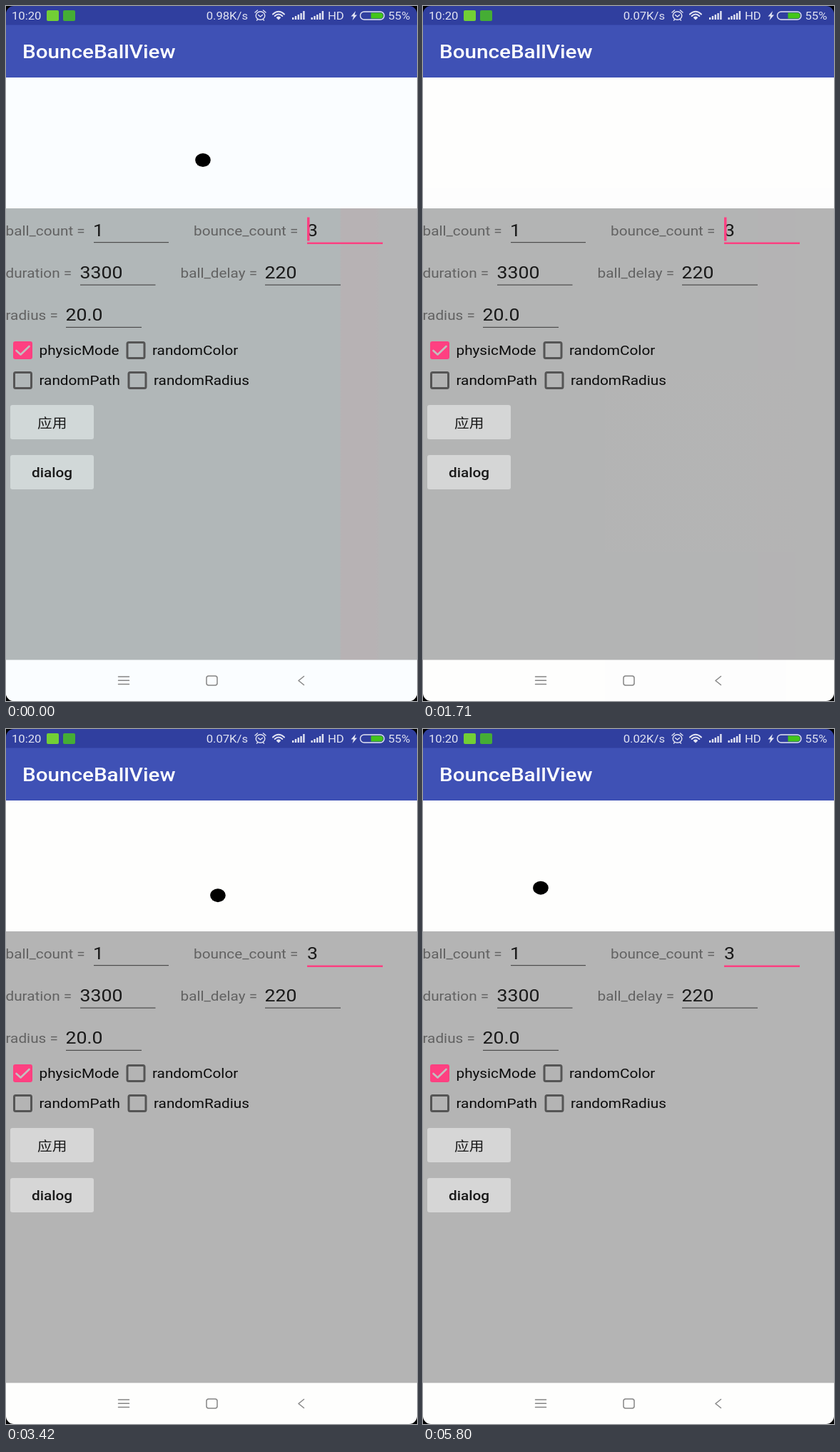
Animation of 576x972 px, one loop 5.84 s. Source, as an HTML page:

```html
<!DOCTYPE html>
<html lang="zh">
<head>
<meta charset="utf-8">
<title>Bounce ball</title>
<style>
  html, body { margin: 0; width: 100%; height: 100%; overflow: hidden; background: #000; }
  svg { display: block; width: 576px; height: 972px; }
  text { font-family: Roboto, "Noto Sans CJK SC", "Noto Sans CJK", sans-serif; white-space: pre; }
  .status { font-size: 14.6px; fill: #e3e5f3; }
  .title { font-size: 26px; font-weight: 500; fill: #fff; }
  .label { font-size: 18.2px; fill: #626262; }
  .field { font-size: 23.4px; fill: #191919; }
  .check { font-size: 18.2px; fill: #0c0c0c; }
  .button { font-size: 18.2px; fill: #191919; }
  .bold { font-weight: 500; }
  .line { fill: none; stroke-linecap: round; stroke-linejoin: round; }
</style>
</head>
<body>
<svg viewBox="0 0 576 972">
  <defs>
    <linearGradient id="tint">
      <stop offset=".812" stop-color="#b1b7b8"/>
      <stop offset=".816" stop-color="#b7b2b4"/>
      <stop offset=".9" stop-color="#b7b2b4"/>
      <stop offset=".91" stop-color="#b4b4b5"/>
    </linearGradient>
    <clipPath id="screen"><rect width="576" height="972" rx="11"/></clipPath>
    <g id="bars" fill="#e3e5f3">
      <rect y="10" width="2.4" height="3"/><rect x="3.8" y="8" width="2.4" height="5"/>
      <rect x="7.6" y="6" width="2.4" height="7"/><rect x="11.4" y="4" width="2.4" height="9"/>
      <rect x="15.2" y="1" width="2.4" height="12"/>
    </g>
    <rect id="box" x="1.5" y="1.5" width="24" height="22" rx="2" fill="none" stroke="#555" stroke-width="3"/>
    <rect id="btn" x="6" width="117" height="48" rx="3"/>
  </defs>

  <g clip-path="url(#screen)">
    <rect width="576" height="27" fill="#303f9f"/>
    <rect y="26.5" width="576" height="74" fill="#3f51b5"/>
    <rect y="100" width="576" height="183" fill="#fefefd"/>
    <rect y="283" width="576" height="632" fill="#b4b4b4"/>
    <rect y="914.5" width="576" height="58" fill="#fefefd"/>
    <g fill="#d6d6d6"><use href="#btn" y="558"/><use href="#btn" y="628"/></g>
    <g id="wash">
      <rect y="100" width="576" height="183" fill="#fafdff"/>
      <rect y="283" width="576" height="632" fill="url(#tint)"/>
      <rect y="914.5" width="576" height="58" fill="#fafdff"/>
      <g fill="#d1d8d8"><use href="#btn" y="558"/><use href="#btn" y="628"/></g>
    </g>

    <rect x="57" y="6" width="17" height="15" rx="2" fill="#72cf35"/>
    <rect x="80" y="6" width="17" height="15" rx="2" fill="#45ad35"/>
    <g class="line" stroke="#e3e5f3" stroke-width="1.4">
      <ellipse cx="356.5" cy="13.5" rx="6.3" ry="5.8"/>
      <path d="M353.5 12.5 356.5 15 359.5 12.5M349 9l3.5-3M364 9l-3.5-3M351.5 20l1.5-1.5M361.5 20l-1.5-1.5"/>
      <path d="M374 11.5q8-7.5 16 0M376.7 14q5.3-5 10.6 0" stroke-width="2"/>
      <path d="M379.6 16.2q2.4-2 4.8 0L382 18.5z" fill="#e3e5f3"/>
      <rect x="496.5" y="8" width="33.5" height="11" rx="5.5"/>
    </g>
    <use href="#bars" x="401" y="6"/>
    <use href="#bars" x="427.5" y="6"/>
    <path d="M490 7 483.5 14.5H487L485.5 20 492 12.5H488.5z" fill="#e3e5f3"/>
    <path d="M511.5 9.5H524.5a4 4 0 0 1 0 8H511.5z" fill="#43c51a"/>

    <use href="#box" x="168.5" y="469"/>
    <use href="#box" x="10" y="511"/>
    <use href="#box" x="170.5" y="511"/>
    <rect x="10" y="469" width="27" height="25" rx="3" fill="#ff4081"/>
    <path class="line" d="M14.5 482 20.5 487.5 32.5 476" stroke="#c3bfbf" stroke-width="2.6"/>

    <g fill="#4d4d4d">
      <rect x="123" y="330" width="105" height="1.2"/>
      <rect x="104" y="389.5" width="105.5" height="1.2"/>
      <rect x="363" y="389.5" width="106" height="1.2"/>
      <rect x="84" y="448.8" width="106" height="1.2"/>
    </g>
    <rect x="422" y="330.5" width="106" height="2.5" fill="#ff4081"/>

    <g class="line" stroke="#858585" stroke-width="1.5">
      <path d="M157.5 938h15M157.5 943.2h15M157.5 948.4h15"/>
      <rect x="281" y="937" width="15" height="13" rx="3"/>
      <path d="M417.5 937.5 410 943.5 417.5 949.5"/>
    </g>

    <g id="texts"></g>
    <rect id="cursor" x="422" y="295.5" width="3.5" height="33" fill="#ff4081"/>
    <ellipse id="ball" rx="10.8" ry="9.5"/>
  </g>
</svg>

<script>
const LOOP = 5840, STEP = 41.75, CYCLE = 3300, START = 1730;
const el = id => document.getElementById(id);
const clamp = (v, lo, hi) => Math.min(hi, Math.max(lo, v));

// Non-square screen pixels: all lettering shares one aspect ratio.
const ASPECT = 1.14;

function addText(kind, x, y, str) {
  const node = document.createElementNS("http://www.w3.org/2000/svg", "text");
  node.setAttribute("class", kind);
  node.setAttribute("transform", `translate(${x} ${y}) scale(${ASPECT} 1)`);
  node.textContent = str;
  el("texts").append(node);
  return node;
}

[
  ["status", 8, 19, "10:20"],
  ["status", 451, 19, "HD"],
  ["status", 535.5, 19, "55%"],
  ["title", 23, 73, "BounceBallView"],
  ["label", -0.5, 321, "ball_count ="],
  ["label", 263, 321, "bounce_count ="],
  ["label", -0.5, 380, "duration ="],
  ["label", 244.5, 380, "ball_delay ="],
  ["label", -0.5, 439, "radius ="],
  ["field", 122, 321.5, "1"],
  ["field", 422, 321.5, "3"],
  ["field", 103.5, 380.5, "3300"],
  ["field", 362.5, 380.5, "220"],
  ["field", 83.5, 439.5, "20.0"],
  ["check", 46.5, 488, "physicMode"],
  ["check", 205, 488, "randomColor"],
  ["check", 46.5, 530, "randomPath"],
  ["check", 207, 530, "randomRadius"],
  ["button", 44, 590, "应用"],
  ["button bold", 36, 659, "dialog"],
].forEach(args => addText(...args));
const speed = addText("status", 280.7, 19, "");

// Horizontal travel over one cycle: [time, x]
const travel = [
  [1730, 24], [1920, 79], [2170, 124], [2500, 165], [2750, 198], [3300, 276],
  [3714, 357], [4090, 451.5], [4510, 537], [4700, 552], [5030, 552],
];

function slope(i) {
  const a = travel[Math.max(i - 1, 0)], b = travel[Math.min(i + 1, travel.length - 1)];
  return (b[1] - a[1]) / (b[0] - a[0]);
}

function ballX(time) {
  let i = 0;
  while (i < travel.length - 2 && time >= travel[i + 1][0]) i++;
  const [t0, x0] = travel[i], [t1, x1] = travel[i + 1];
  const d = t1 - t0, u = (time - t0) / d, v = 1 - u;
  return v * v * (1 + 2 * u) * x0 + u * u * (3 - 2 * u) * x1
    + d * u * v * (v * slope(i) - u * slope(i + 1));
}

// Four quadratic arcs, each lower than the one before; the last drops to the edge.
function ballY(x) {
  const floor = 244, width = 132;
  const arc = clamp(Math.floor((x - 24) / width), 0, 3);
  const u = (x - 24) / width - arc, v = 1 - u;
  const control = -11.4 + 82.8 * arc;
  return v * v * floor + 2 * u * v * control + u * u * (arc === 3 ? 283 : floor);
}

function draw(t) {
  // The picture advances in even steps after a longer first one.
  const now = t < 80 ? 0 : 80 + Math.floor((t - 80) / STEP + 0.1) * STEP;

  const phase = START + (now - START + CYCLE) % CYCLE;
  const x = ballX(phase);
  const ball = el("ball");
  ball.setAttribute("cx", x);
  ball.setAttribute("cy", ballY(x));
  ball.setAttribute("opacity", phase > 4700 ? 0 : clamp((561 - x) / 137, 0, 1));

  const blink = (now - 130 + 1040) % 1040;
  el("cursor").setAttribute("opacity", blink < 520 ? 0 : 1);
  speed.textContent = now < 1180 ? "0.98K/s" : now < 4300 ? "0.07K/s" : "0.02K/s";
  el("wash").setAttribute("opacity", clamp((1750 - now) / 1200, 0, 1));
}

const origin = performance.now();
function tick() {
  draw((performance.now() - origin) % LOOP);
  requestAnimationFrame(tick);
}
tick();
</script>
</body>
</html>
```
